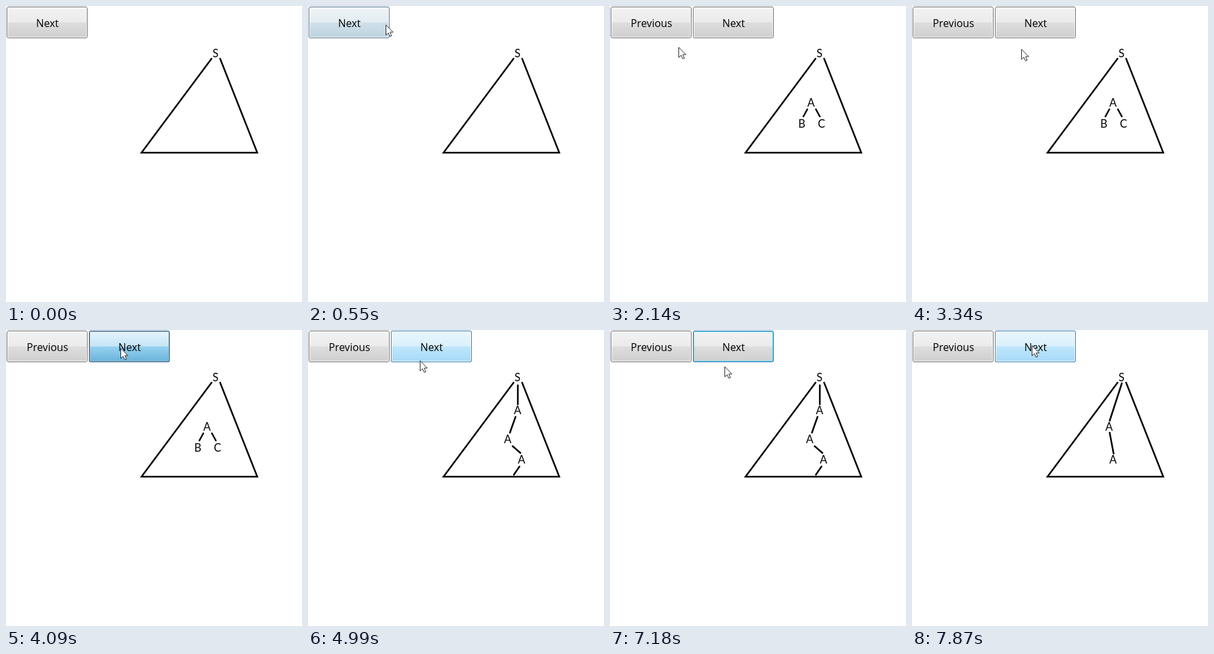
An HTML page for the animation above (8000 ms loop, 450 px wide and 450 px high).

```html
<!DOCTYPE html>
<html lang="en">
<head>
<meta charset="utf-8">
<title>Tree slides</title>
<style>
  html, body { margin: 0; width: 100%; height: 100%; overflow: hidden; background: #fff; }
  svg { display: block; width: 100%; height: 100%; }
  text { text-anchor: middle; }
  .label { font: 15.8px "Open Sans", "Noto Sans", sans-serif; }
  .node { font: 16.6px Lato, Carlito, sans-serif; }
  .line { fill: none; stroke: #000; stroke-width: 2.5; stroke-linecap: round; }
</style>
</head>
<body>
<svg id="stage" viewBox="0 0 450 450"></svg>
<script>
const LOOP = 8000, TICK = 30, OFFSET = 10;

// border, inner edge, then the upper and lower halves of the gradient
const skins = {
  normal:  ['#707070', '#fbfbfb', '#f2f2f2', '#ebebeb', '#dddddd', '#cfcfcf'],
  focus:   ['#3c7fb1', '#48d0f6', '#f2f2f2', '#ebebeb', '#dddddd', '#cfcfcf'],
  hot:     ['#3c7fb1', '#f3fbfe', '#eaf6fd', '#d9f0fc', '#bee6fd', '#a7d9f5'],
  pressed: ['#2c628b', '#9eb0ba', '#e5f4fc', '#c4e5f6', '#98d1ef', '#68b3db']
};

const gradient = ([name, c]) => `<linearGradient id="${name}" x2="0" y2="1">
  <stop stop-color="${c[2]}"/><stop offset=".5" stop-color="${c[3]}"/>
  <stop offset=".5" stop-color="${c[4]}"/><stop offset="1" stop-color="${c[5]}"/></linearGradient>`;

const skin = ([name, c]) => `<g class="${name}">
  <rect x=".5" y=".5" width="122" height="47" rx="2.5" fill="url(#${name})" stroke="${c[0]}"/>
  <rect x="1.5" y="1.5" width="120" height="45" rx="1.5" fill="none" stroke="${c[1]}"/></g>`;

const button = (id, x) => `<g id="${id}" transform="translate(${x} 1)">
  ${Object.entries(skins).map(skin).join('')}
  <text class="label" x="62" y="31">Next</text></g>`;

const node = (s, x, y) => `<text class="node" x="${x}" y="${y + 6}">${s}</text>`;
const lines = d => `<path class="line" d="${d}"/>`;
const slide = body => `<g class="slide">${body}</g>`;

stage.innerHTML = `<defs>${Object.entries(skins).map(gradient).join('')}</defs>
  ${lines('M312.5 80L206 223H382L325.5 80')}${node('S', 318.5, 72)}
  ${slide('')}
  ${slide(lines('M300 157L294 168M313 157L319 168') +
    node('A', 305.5, 147) + node('B', 291.5, 179) + node('C', 321.5, 179))}
  ${slide(lines('M319 84V113M315.5 132L307 156M311 176.5L323 187M321.5 207.5L313 220') +
    node('A', 318.5, 122) + node('A', 303.5, 166) + node('A', 324.5, 197))}
  ${slide(lines('M319 81L300.5 138M300.5 156L306.5 188') +
    node('A', 299.5, 147) + node('A', 305.5, 197))}
  ${button('left', 1)}${button('right', 126)}
  <path id="pointer" fill="#fff" stroke="#222" stroke-width=".95"
    d="M.5 .8V16.2L4.1 12.9L6.6 18.4L9.1 17.3L6.7 11.9H11.4Z"/>`;

// [time, x, y]
const path = [
  [100, 446, 22], [400, 150, 26], [760, 73, 30], [1690, 73, 30], [2140, 104, 62],
  [2500, 143, 76], [2860, 162, 76], [3010, 162, 76], [3340, 166, 65], [3490, 166, 65],
  [3790, 174, 27], [4570, 174, 27], [4600, 174, 28], [4720, 174, 28], [4990, 170, 46],
  [5530, 166, 74], [5920, 166, 90], [6820, 166, 90], [7510, 182, 23]
];
// [time, amount of highlight]
const leftHeat = [[460, 0], [670, 1], [1840, 1], [2110, 0]];
const rightHeat = [[3610, 0], [3790, 1], [5020, 1], [5320, 0], [7240, 0], [7450, 1]];
// [mouse down, next slide]
const clicks = [[1000, 1090], [4090, 4240], [7720, 7870]];

function at(keys, t) {
  const i = keys.findIndex(k => k[0] > t);
  if (i < 0) return keys[keys.length - 1].slice(1);
  if (i === 0) return keys[0].slice(1);
  const a = keys[i - 1], b = keys[i], f = (t - a[0]) / (b[0] - a[0]);
  return a.slice(1).map((v, j) => v + (b[j + 1] - v) * f);
}

const show = (el, on) => el.style.display = on ? '' : 'none';

function paint(el, heat, pressed, focus) {
  show(el.querySelector('.focus'), focus);
  show(el.querySelector('.pressed'), pressed);
  el.querySelector('.hot').style.opacity = heat;
}

const left = document.getElementById('left'), right = document.getElementById('right');
const pointer = document.getElementById('pointer');
const slides = document.querySelectorAll('.slide');

function draw(now) {
  const t = Math.floor((now % LOOP - OFFSET) / TICK) * TICK + OFFSET;
  const page = clicks.filter(c => t >= c[1]).length;
  const down = clicks.findIndex(c => t >= c[0] && t < c[1]);

  slides.forEach((s, i) => show(s, i === page));
  left.querySelector('text').textContent = page ? 'Previous' : 'Next';
  show(right, page > 0);
  paint(left, at(leftHeat, t)[0], down === 0, false);
  paint(right, at(rightHeat, t)[0], down > 0, page > 1);

  show(pointer, t >= 100);
  const [x, y] = at(path, t).map(Math.round);
  pointer.setAttribute('transform', `translate(${x} ${y})`);
}

let start;
function frame(now) {
  start ??= now;
  draw(now - start);
  requestAnimationFrame(frame);
}
draw(0);
requestAnimationFrame(frame);
</script>
</body>
</html>
```
